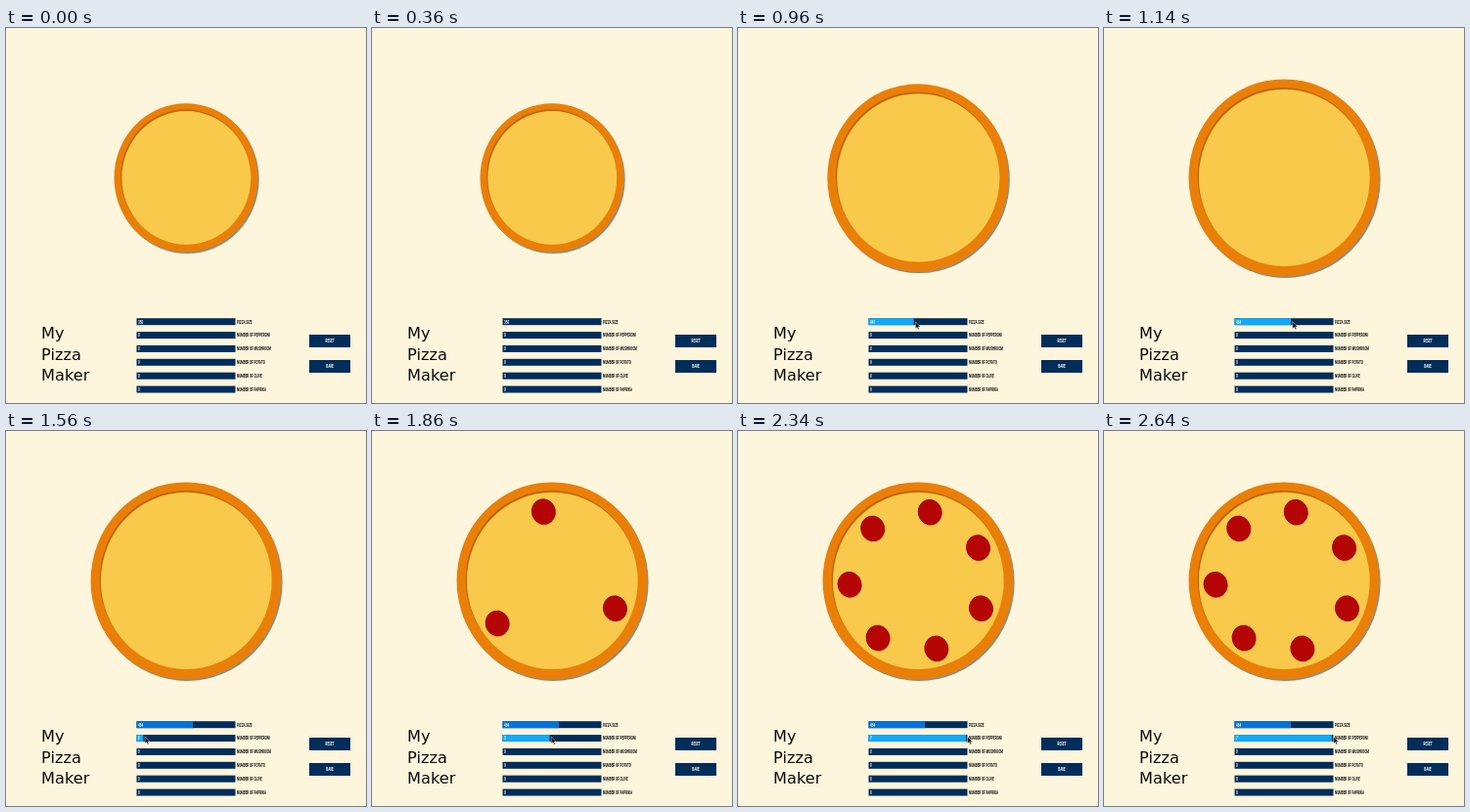
Animation, 368 px wide and 384 px high, one loop 2.7 s. Source, as an HTML page:

```html
<!DOCTYPE html>
<html lang="en">
<head>
<meta charset="utf-8">
<title>My Pizza Maker</title>
<style>
  html, body { margin: 0; width: 100%; height: 100%; overflow: hidden; background: #fdf5dc; }
  svg { display: block; width: 100%; height: 100%; }
  .title { font: 16.2px "DejaVu Sans", sans-serif; fill: #0b0b0b; }
  .small { font: bold 5.4px Roboto, "Liberation Sans", sans-serif; fill: #111; }
  .light { fill: #fff; }
  .mid { text-anchor: middle; }
  .bar { fill: #002d5a; }
  .pepperoni { fill: #b50404; stroke: #a00000; stroke-width: .8; }
</style>
</head>
<body>
<svg viewBox="0 0 368 384">
  <rect width="368" height="384" fill="#fdf5dc"/>
  <g id="pizza">
    <ellipse fill="#8f8d80"/>
    <ellipse fill="#ea7f08"/>
    <ellipse fill="#c06405"/>
    <ellipse fill="#f8c94a"/>
  </g>
  <g id="toppings" class="pepperoni"></g>
  <g class="title">
    <text x="36" y="318">My</text>
    <text x="36" y="339.7">Pizza</text>
    <text x="36" y="361.3">Maker</text>
  </g>
  <g id="panel"></g>
  <path id="cursor" d="M0 0V7L1.7 5.6L2.8 8L3.9 7.5L2.9 5.2H5Z" fill="#111" stroke="#fff" stroke-width=".4"/>
</svg>
<script>
const LOOP = 2700, STEP = 60;
const BAR_X = 133.5, BAR_W = 101, BAR_H = 7;
const CX = 184, CY = 153.4;
const $ = id => document.getElementById(id);

function setAttrs(el, attrs) {
  for (const k in attrs) el.setAttribute(k, attrs[k]);
}
function add(parent, tag, attrs, text) {
  const el = document.createElementNS("http://www.w3.org/2000/svg", tag);
  setAttrs(el, attrs);
  if (text !== undefined) el.textContent = text;
  parent.append(el);
  return el;
}

const panel = $("panel"), cursor = $("cursor");

// The panel uses one condensed face throughout.
function addLabel(x, y, text, cls = "") {
  return add(panel, "text", { class: "small " + cls, transform: `translate(${x} ${y}) scale(.56 1)` }, text);
}

const toppingNames = ["PEPPERONI", "MUSHROOM", "POTATO", "OLIVE", "PAPRIKA"];
const sliders = ["PIZZA SIZE", ...toppingNames.map(n => "NUMBER OF " + n)].map((name, i) => {
  const y = 297.2 + 13.87 * i;
  const box = { x: BAR_X, y, width: BAR_W, height: BAR_H };
  add(panel, "rect", { ...box, class: "bar" });
  const fill = add(panel, "rect", { ...box, width: 0 });
  addLabel(236, y + 5.4, name);
  return { fill, value: addLabel(135, y + 5.4, i ? 0 : 350, "light") };
});

["RESET", "BAKE"].forEach((name, i) => {
  const y = 314 + 26 * i;
  add(panel, "rect", { x: 310, y, width: 42, height: 13, class: "bar" });
  addLabel(331, y + 8.4, name, "light mid");
});

const layers = [...$("pizza").children];
const slices = Array.from({ length: 7 }, () => add($("toppings"), "ellipse", { rx: 12, ry: 13 }));

const progress = (t, from, to) => Math.min(1, Math.max(0, (t - from) / (to - from)));
const smooth = p => p * p * (3 - 2 * p);
const mix = (a, b, p) => a + (b - a) * p;

function drawSlider({ fill, value }, level, text, active) {
  setAttrs(fill, { width: level * BAR_W, fill: active ? "#11a9fa" : "#0872d8" });
  value.textContent = text;
}

function drawPizza(size) {
  const rx = size * .21, ry = size * .2177;
  const place = (layer, dx, dy, k) =>
    setAttrs(layer, { cx: CX + dx, cy: CY + dy, rx: rx * k, ry: ry * k });
  place(layers[0], 1.2, 1.5, 1);
  place(layers[1], 0, 0, 1);
  place(layers[2], -.6, -1.5, .9);
  place(layers[3], .3, 0, .897);
}

function drawToppings(count) {
  slices.forEach((slice, i) => {
    const shown = i < count;
    const a = .4 + i * 2 * Math.PI / Math.max(count, 1);
    const x = CX + 70 * Math.cos(a), y = CY + .4 + 71.7 * Math.sin(a);
    setAttrs(slice, {
      transform: `translate(${x} ${y}) rotate(-15)`,
      visibility: shown ? "visible" : "hidden"
    });
  });
}

function drawCursor(t, sizeLevel, countLevel) {
  const enter = progress(t, 480, 660), hop = smooth(progress(t, 1140, 1480));
  const x = mix(BAR_X + sizeLevel * BAR_W, BAR_X + countLevel * BAR_W, hop) + 1.7;
  setAttrs(cursor, {
    transform: `translate(${mix(170, x, enter)} ${mix(358, mix(300.8, 313, hop), enter)})`,
    visibility: t < 480 ? "hidden" : "visible"
  });
}

function draw(now) {
  const t = Math.floor(now % LOOP / STEP) * STEP;
  const sizeLevel = .57 * smooth(progress(t, 660, 1080));
  const countLevel = .985 * progress(t, 1480, 2160) ** 1.25;
  const size = 350 + 200 * sizeLevel;
  const count = Math.floor(8 * countLevel);
  drawSlider(sliders[0], sizeLevel, Math.round(size), t < 1260);
  drawSlider(sliders[1], countLevel, count, true);
  drawPizza(size);
  drawToppings(count);
  drawCursor(t, sizeLevel, countLevel);
}

const startTime = performance.now();
function tick() {
  draw(performance.now() - startTime);
  requestAnimationFrame(tick);
}
tick();
</script>
</body>
</html>
```
